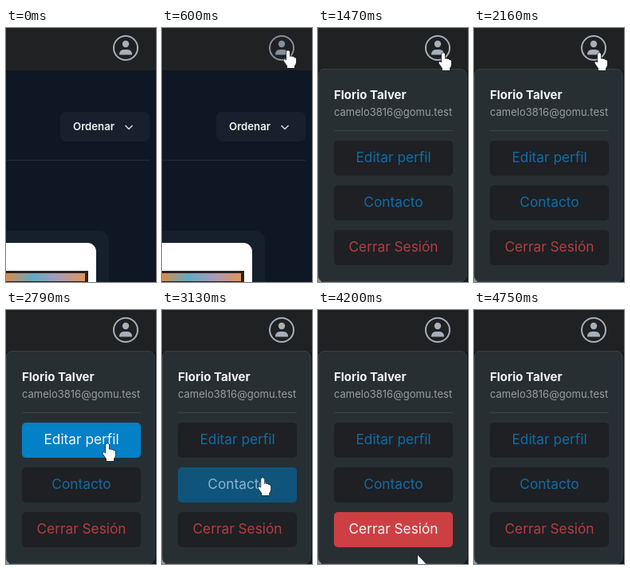
Write an HTML page with a canvas that moves like this. It is 188 px wide and 318 px high and loops after 4.77 s.

```html
<!DOCTYPE html>
<html lang="es">
<head>
<meta charset="utf-8">
<title>Menú de usuario</title>
<style>
html, body { margin: 0; width: 100%; height: 100%; overflow: hidden; background: #0f1724; }
canvas { display: block; width: 188px; height: 318px; }
</style>
</head>
<body>
<canvas id="stage"></canvas>
<script>
const LOOP = 4770, W = 188, H = 318;
const OPEN = 1410, FADE = 150;
const canvas = document.getElementById('stage');
const ctx = canvas.getContext('2d');
const dpr = window.devicePixelRatio || 1;
canvas.width = W * dpr;
canvas.height = H * dpr;

const HAND = new Path2D('M-2 1.5Q0-1 2 1.5V8Q3.5 6.5 5 8Q6.5 7.2 7.5 9Q10 8.5 10 11V15Q9.5 18 8 19V22H-1V19.5L-5.5 13Q-5.5 10-2 12.5Z');
const ARROW = new Path2D('M0 0V17L4 13.5 6.5 19 9 18 6.7 12.5H12Z');
const SHOULDERS = new Path2D('M142 33.5Q142 27 148 27H152Q158 27 158 33.5Z');

const MOVES = [
  { from: 130, to: 600, x: 158, y: 28 },
  { from: OPEN, to: 1470, x: 157, y: 31 },
  { from: 2160, to: 2540, x: 127, y: 167 },
  { from: 2900, to: 3230, x: 126, y: 222 },
  { from: 3330, to: 3510, x: 123, y: 277 },
  { from: 3520, to: 3750, x: 125, y: 307 },
  { from: 3830, to: 3870, x: 126, y: 324 }
];
const BUTTONS = [
  { label: 'Editar perfil', ink: '#116ca6', fill: '#0380c6', enter: 2400, leave: 2960 },
  { label: 'Contacto', ink: '#116ca6', fill: '#0380c6', enter: 3050, leave: 3402 },
  { label: 'Cerrar Sesión', ink: '#b83c40', fill: '#cc4044', enter: 3427, leave: 3830 }
];
BUTTONS.forEach((b, i) => b.y = 141 + 56 * i);

const progress = (t, from, to) => Math.min(1, Math.max(0, (t - from) / (to - from)));
const smooth = k => k * k * (3 - 2 * k);
const fade = (t, at) => progress(t, at, at + FADE);

// The picture stands still for 450 ms on the last button.
const paused = t => t < 3510 ? t : Math.max(3510, t - 450);

function cursorAt(t) {
  return MOVES.reduce((p, m) => {
    const k = smooth(progress(t, m.from, m.to));
    return { x: p.x + (m.x - p.x) * k, y: p.y + (m.y - p.y) * k };
  }, { x: 120, y: 322 });
}

function mix(a, b, k) {
  const part = (c, i) => parseInt(c.slice(i, i + 2), 16);
  return `rgb(${[1, 3, 5].map(i => Math.round(part(a, i) + (part(b, i) - part(a, i)) * k))})`;
}

function rect(x, y, w, h, fill) {
  ctx.fillStyle = fill;
  ctx.fillRect(x, y, w, h);
}

function box(x, y, w, h, r, fill, stroke) {
  ctx.beginPath();
  ctx.roundRect(x, y, w, h, r);
  ctx.fillStyle = fill;
  ctx.fill();
  if (stroke) {
    ctx.strokeStyle = stroke;
    ctx.lineWidth = 1;
    ctx.stroke();
  }
}

function text(str, x, y, font, fill, align = 'left') {
  ctx.font = font + ' Inter, sans-serif';
  ctx.textAlign = align;
  ctx.fillStyle = fill;
  ctx.fillText(str, x, y);
}

function drawPage() {
  rect(0, 0, W, H, '#0f1724');
  rect(0, 0, W, 53, '#202123');
  box(68, 105, 112, 37, 7, '#17202c');
  text('Ordenar', 84, 128, '600 13.2px', '#f0f2f5');
  ctx.strokeStyle = '#d5dae0';
  ctx.lineWidth = 1.5;
  ctx.stroke(new Path2D('M149.5 122L154 126.5L158.5 122'));
  rect(0, 165, 180, 1, '#232c3a');

  box(-20, 254, 149, 90, 12, '#16202c');
  box(-20, 269, 133, 70, 11, '#fff');
  rect(0, 304, 103, 14, '#2b2224');
  const art = ctx.createLinearGradient(0, 312, 99, 318);
  ['#d98b4a', '#62a9c4', '#a99bb8', '#e09555']
    .forEach((c, i, all) => art.addColorStop(i / (all.length - 1), c));
  rect(0, 307, 99, 10, art);
}

function drawAvatar(tint) {
  ctx.strokeStyle = ctx.fillStyle = tint;
  ctx.lineWidth = 2;
  ctx.beginPath();
  ctx.arc(150, 25, 15, 0, 7);
  ctx.stroke();
  ctx.beginPath();
  ctx.arc(150, 20, 4.2, 0, 7);
  ctx.fill();
  ctx.fill(SHOULDERS);
}

function drawMenu(t) {
  ctx.globalAlpha = progress(t, OPEN, 1470);
  rect(0, 311, 4, 7, '#8b9094');
  box(.5, 51.5, 185.5, 266, 7, '#282f32', '#3a4144');
  text('Florio Talver', 20, 89, '700 15px', '#f1f3f4');
  text('camelo3816@gomu.test', 20, 109.5, '400 13px', '#979c9f');
  rect(20, 128, 149, 1, '#3c4346');
  for (const b of BUTTONS) {
    const k = fade(t, b.enter) - fade(t, b.leave);
    box(20, b.y, 149, 44, 5, mix('#1e2024', b.fill, k));
    text(b.label, 94.5, b.y + 27, '400 17.3px', mix(b.ink, '#f2f5f7', k), 'center');
  }
  ctx.globalAlpha = 1;
}

const overAvatar = p => Math.hypot(p.x - 150, p.y - 25) < 16;
const overButton = p => p.x > 20 && p.x < 169 && BUTTONS.some(b => p.y >= b.y && p.y < b.y + 44);

function drawCursor(p, t) {
  const shape = overAvatar(p) || t > OPEN && overButton(p) ? HAND : ARROW;
  ctx.save();
  ctx.translate(p.x, p.y);
  ctx.lineJoin = 'round';
  ctx.lineWidth = 1.4;
  ctx.strokeStyle = '#22262a';
  ctx.stroke(shape);
  ctx.fillStyle = '#fff';
  ctx.fill(shape);
  ctx.restore();
}

function draw(t) {
  ctx.setTransform(dpr, 0, 0, dpr, 0, 0);
  const p = cursorAt(t);
  drawPage();
  drawAvatar(t < OPEN && overAvatar(p) ? '#84919d' : '#a8b0ba');
  if (t >= OPEN) drawMenu(t);
  drawCursor(p, t);
}

const start = performance.now();
function tick() {
  draw(paused((performance.now() - start) % LOOP));
  requestAnimationFrame(tick);
}
tick();
</script>
</body>
</html>
```
